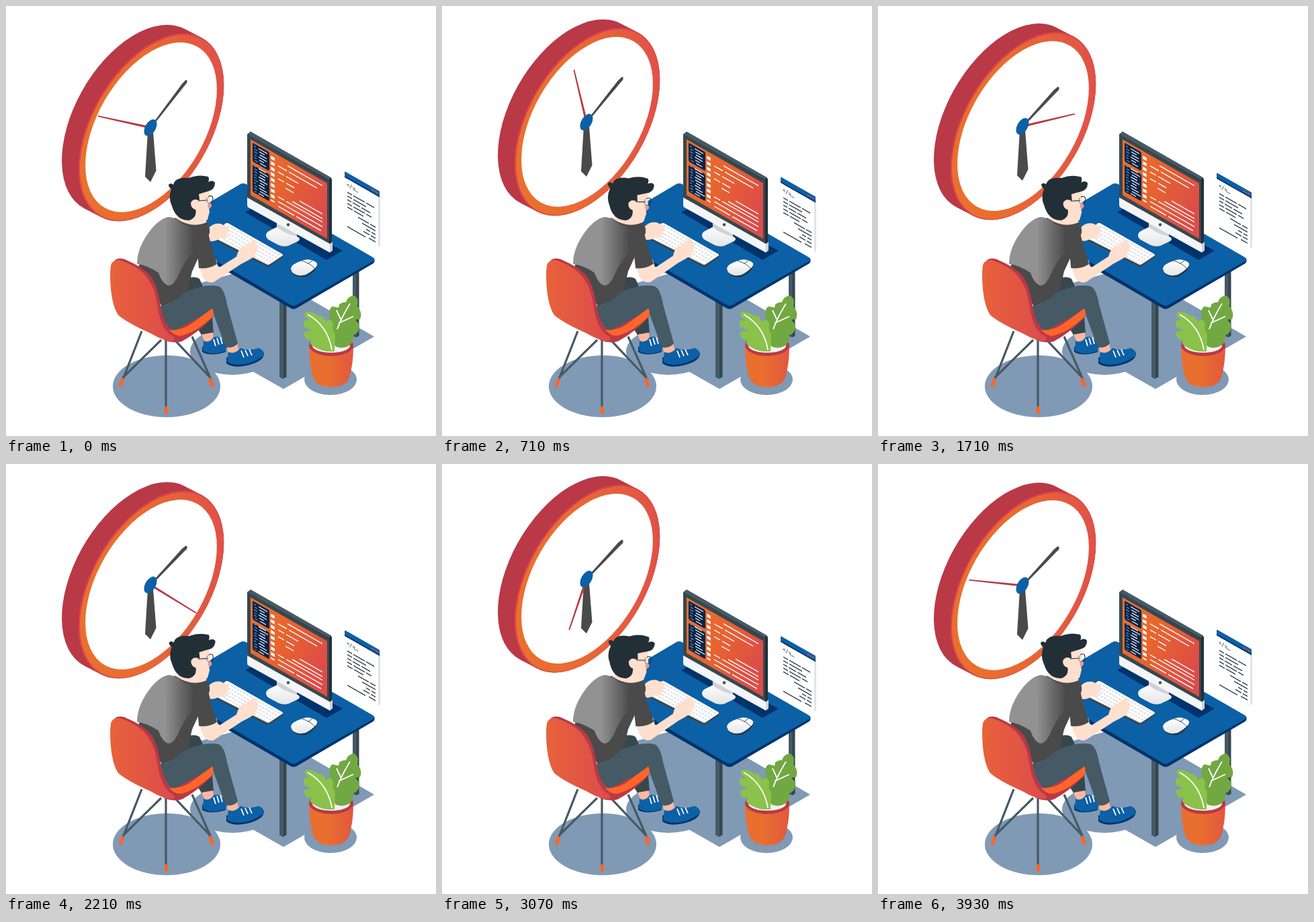
These frames come from a looping animation (640 by 640 pixels, 4 s). An HTML page:

```html
<!DOCTYPE html>
<html lang="en">
<head>
<meta charset="utf-8">
<title>Working against the clock</title>
<style>
  html, body { margin: 0; width: 100%; height: 100%; overflow: hidden; background: #fff; }
  svg { display: block; width: 100%; height: 100%; }
  .blue { fill: #0c60a6 } .navy { fill: #00336b } .crimson { fill: #b93946 } .skin { fill: #ffdfcd }
  .slate { fill: #455a64 } .dark { fill: #37474f } .char { fill: #4a4a4a } .hair { fill: #232f36 }
  .orange { fill: #ff652a } .shade { fill: #8099b5 } .white { fill: #fff }
  .line { fill: none; stroke: #fff; stroke-width: 1.8 }
</style>
</head>
<body>
<svg viewBox="0 0 640 640">
  <defs>
    <linearGradient id="ring"><stop offset=".1" stop-color="#ea702e"/><stop offset=".45" stop-color="#e96a31"/><stop offset="1" stop-color="#e05148"/></linearGradient>
    <linearGradient id="seat"><stop stop-color="#e8623b"/><stop offset="1" stop-color="#dc4b4b"/></linearGradient>
    <linearGradient id="screen" y2=".3"><stop offset=".1" stop-color="#e9702f"/><stop offset=".5" stop-color="#e7642f"/><stop offset="1" stop-color="#dc4d48"/></linearGradient>
    <linearGradient id="shirt"><stop offset=".48" stop-color="#929292"/><stop offset=".98" stop-color="#4a4a4a"/></linearGradient>
    <linearGradient id="pot"><stop offset=".4" stop-color="#e96f2e"/><stop offset="1" stop-color="#e2573f"/></linearGradient>
    <linearGradient id="base" x2="0" y2="1"><stop offset=".3" stop-color="#fafafa"/><stop offset="1" stop-color="#e3e5e7"/></linearGradient>
  </defs>

  <g class="shade">
    <ellipse cx="239" cy="566" rx="80" ry="46"/>
    <ellipse cx="483" cy="556" rx="39" ry="23"/>
    <ellipse cx="337" cy="514" rx="63" ry="35"/>
    <path d="M290 412 350 395 440 429 548 492 413 570 290 500Z"/>
  </g>

  <g id="clock">
    <g transform="matrix(.866 -.5 0 1 216 180.5)">
      <path d="M-28.5-27 0 0" stroke="#b93946" stroke-width="250" stroke-linecap="round"/>
      <circle r="125" fill="#db444b"/>
      <circle cx="1.100" cy="1.100" r="123.500" fill="url(#ring)"/>
      <circle r="113" class="white"/>
    </g>
    <g transform="translate(215 181)">
      <path class="char" d="M-4 6H4L8.500 64 0 81-8 73Z"/>
      <path id="minute" class="char" d="M7-11 9-9.500 50-61.500 54.500-67V-71L52-70.500 46.500-64.500Z"/>
      <path id="second" class="crimson" d="M0-1.700 80-.9V.9L0 1.700Z"/>
      <circle class="blue" r="11" transform="matrix(.866 -.5 0 1 0 0)"/>
    </g>
  </g>

  <g id="page">
    <path fill="#e1e3e5" d="M553 282 557 280V357L553 359Z"/>
    <g transform="matrix(1 .57 0 1 504 246)">
      <path class="white" d="M0 8H50V84H0Z"/>
      <path class="blue" d="M1 0H52V8H0V1Z"/>
      <path class="navy" d="M0 7H52V9H0Z"/>
      <path stroke="#e0524a" stroke-width="2.200" stroke-dasharray="2 1.500" d="M40 4.500h10"/>
      <text x="3" y="20.500" font-family="Roboto, sans-serif" font-size="9" fill="#37474f">&lt;/&gt;</text>
      <path stroke="#37474f" stroke-width="1.400" stroke-dasharray="1.400 1" d="M14 20h6"/>
      <path stroke="#263844" stroke-width="1.500" fill="none" d="M4 29h7m2 0h17m2 0h12M4 34.500h7m2 0h19M4 40h6m2 0h11m2 0h13M4 45.500h7m2 0h17m2 0h8M4 51h8m2 0h14M20 57h16m2 0h8M26 62.500h20M32 68h6m2 0h6M28 73.500h9m2 0h7M4 80h27M36 79h10"/>
    </g>
  </g>

  <g id="desk">
    <path class="dark" d="M516 393h9.500v98l-4 2-5.500-2Z"/>
    <path class="slate" d="M516 393h5v99l-5-2Z"/>
    <path class="dark" d="M407 432h10.500v120l-5 3-5.500-3Z"/>
    <path class="slate" d="M407 432h6v123l-6-3Z"/>
    <path class="navy" d="M234 333 548.500 377V380Q548 382 546 383.500L432 450q-4 2-8 0L234 340Z"/>
    <path class="blue" d="M349 265q4-2 8 0L546 374q5 3 0 6L432 445q-4 2-8 0L234 333Z"/>
    <path class="navy" d="M356 307 372 298 501 364 477 378Z"/>
  </g>

  <g id="monitor">
    <path fill="url(#base)" d="M387 341q0-4 6-7l10-5V321l30 16v6q7 3 2 7l-15 7q-7 2-14-1l-15-8q-4-3-4-7Z"/>
    <path fill="#cfd3d6" d="M403 321 433 337V343Q412 338 403 329Z"/>
    <path class="hair" d="M359 191 364 187 483 255q2 1 2 4V352L482 355 359 286Z"/>
    <path class="slate" d="M359 191 364 187 483 255 481 259Z"/>
    <path class="dark" d="M359 191 481 260V355L359 286Z"/>
    <g transform="matrix(1 .57 0 1 363 197)">
      <path fill="url(#screen)" d="M1 1H115V84H1Z"/>
      <path fill="#0a2547" d="M6 4H27q2 0 2 2V30q0 2-2 2H6q-2 0-2-2V6q0-2 2-2ZM6 37H27q2 0 2 2V75q0 2-2 2H6q-2 0-2-2V39q0-2 2-2Z"/>
      <path class="line" stroke-dasharray="4.500 3.600" style="stroke-width:5.500" d="M34 8V75"/>
      <path class="line" style="stroke-width:1.600" d="M56 9h52M42 17h13m3 0h42M42 26h9m3 0h18M42 36h9m3 0h12M53 44h12M74 51h34M63 58h45M42 63h9m3 0h54M42 70h66M42 77h24m3 0h37"/>
      <path id="menu" class="line" style="stroke-width:1.300"/>
      <path id="bullets" fill="none" stroke="#6c98c9" stroke-width="1.200"/>
    </g>
    <path fill="#f4f5f6" d="M359 285 482 354V367L361 300q-2-1-2-4Z"/>
    <path fill="#cfd3d6" d="M482 354 486 351V364L482 367Z"/>
    <circle cx="420" cy="325.500" r="2.200" class="char"/>
  </g>

  <g id="keyboard">
    <path class="dark" d="M309 345 391 383 412 370V374L392 388q-3 1-6-1L309 348Z"/>
    <path class="white" d="M326 324q3-2 6 0l79 45q2 2 0 3l-18 12q-3 2-6 0L308 344Z"/>
    <path id="keys" fill="none" stroke="#d9dce0" stroke-width="1.700" stroke-dasharray="3.800 1.500"/>
  </g>

  <g id="mouse">
    <path fill="#26323a" d="M424 391q6 12 21 10 10-3 17-16l1 3q-5 10-17 15-17 2-22-9Z"/>
    <path fill="url(#base)" d="M424 390q2-6 14-10 10-5 19-1 9 3 5 9-5 6-16 12-11 3-18-2-4-3-4-8Z"/>
    <path fill="none" stroke="#455a64" d="M440 379Q453 383 460 391M449 384 456 379"/>
  </g>

  <g id="plant">
    <path fill="url(#pot)" d="M451 505H517Q517 536 510 555 504 567 484 567.500 464 567 458 555 451 536 451 505Z"/>
    <ellipse cx="484" cy="505" rx="33" ry="16" class="crimson"/>
    <ellipse cx="484" cy="505.500" rx="28" ry="10.500" fill="#f5f0ec"/>
    <path fill="#72a842" d="M491 507Q474 486 482 466 479 451 486 447L495 449 496 444Q503 440 506 441 508 432 518 431 526 435 523 447 531 456 527 466L520 467 526 474Q527 487 517 490 518 500 510 506 500 511 491 507Z"/>
    <path fill="#8ac24a" d="M489 514Q471 516 457 506 450 503 455 497 441 497 444 485L455 483 443 477V468L452 468Q441 461 446 455 457 455 465 461 473 460 476 470 485 463 487 474 485 485 490 487Z"/>
    <path class="line" d="M449 459Q479 476 485 512M493 481Q500 462 512 443M498 466 492 453M495 472 517 462"/>
  </g>

  <g id="backHand">
    <path class="skin" d="M299 344V333Q308 322 319 324L331 329Q334 332 329 333L333 336 328 338 332 343 326 342 327 347 320 345Q312 351 304 350Z"/>
  </g>

  <g id="legs">
    <path class="dark" d="M262 408Q280 400 288 406L293 417 270 430ZM278 455 306 452 309 487 292 491 283 477Z"/>
    <path fill="#ffb89f" d="M291 489 308 486 309 497 296 500ZM328 508 344 503 347 514 332 518Z"/>
    <path class="navy" d="M292 507V515Q304 522 327 515V510ZM328 523V532Q340 541 366 533 385 527 384 516Z"/>
    <path class="blue" d="M294 498Q302 503 309 493 319 490 326 501 331 511 325 514 306 521 293 513ZM331 515Q341 519 349 509 361 514 376 509 386 513 383 521 364 534 347 534 334 534 329 529Z"/>
    <path class="line" d="M309 496 312 506M314 494 317 504M319 493 322 503M350 513 354 523M356 512 360 521M362 511 366 520"/>
  </g>

  <g id="body">
    <path class="skin" d="M253 319 260 305H290L299 322Q280 332 253 323Z"/>
    <g id="head">
      <path class="skin" d="M270 285 302 274 304 291 306 298 302 302 303 306 300 318Q292 324 283 320L270 318Z"/>
      <path fill="#ff8e80" d="M301 294 306 297 303 302Q299 299 301 294Z"/>
      <path class="hair" d="M246 273Q240 267 243 265 246 263 249 266 252 254 272 256 287 250 301 254 303 258 301 262 308 258 311 263 311 274 300 276 293 278 287 280L288 288 282 302Q285 315 273 319 254 320 247 298 241 286 246 273Z"/>
      <path class="skin" d="M288 290Q279 285 275 293 275 301 282 303 288 303 288 290Z"/>
      <path fill="none" stroke="#232f36" stroke-width="1.100" d="M286 290 300 289M301 284Q308 280 308 288 307 294 302 294"/>
      <path fill="none" stroke="#5d83a7" d="M299 285V291Q300 294 304 294"/>
    </g>
    <path class="char" d="M252 315Q275 332 299 322 304 329 303 338L277 395 268 434 232 447 197 389 210 350Z"/>
    <path fill="url(#shirt)" d="M243 314Q254 315 264 325 283 329 279 338 274 352 281 365 267 376 256 402 247 420 239 415 231 410 227 397 211 386 195 384 195 358 217 331 231 315 243 314Z"/>
    <path class="slate" d="M226 447Q247 446 266 426 296 413 316 417 325 420 329 444L345 502Q339 510 327 508L308 456 250 490 229 480Z"/>
  </g>

  <g id="arm">
    <path class="skin" d="M287 386 313 378 316 390 343 373Q346 360 355 357L367 349Q374 346 371 353L376 357 374 364 370 373Q360 379 350 384L309 411Q298 414 292 402Z"/>
    <path class="char" d="M280 336Q291 324 301 337 304 354 314 384 302 392 287 390L285 368Q272 354 280 336Z"/>
  </g>

  <g id="chair">
    <path fill="none" stroke="#455a64" stroke-width="3.200" d="M202 484 173 558M238 496V603M277 492 306 558M174 553 231 497M251 497 303 552"/>
    <path fill="none" stroke="#ff652a" stroke-width="5" d="M174 554 170 567M238.500 596V607M303 554 308 567"/>
    <path class="crimson" d="M162 378Q171 373 181 379 213 393 220 410 226 421 230 446 235 475 249 484L308 452V463Q285 487 262 499 249 503 235 497Z"/>
    <path class="orange" d="M243 482Q263 484 280 470L307 450Q311 456 306 464 284 484 264 490 252 493 243 482Z"/>
    <path fill="url(#seat)" d="M156 386Q160 375 172 379 204 391 213 409 222 421 226 449 231 483 249 492 254 498 245 499 232 497 215 487 181 472 167 460 155 442 155 397Z"/>
  </g>
</svg>
<script>
  const LOOP = 4000, STEP = LOOP / 56;
  const el = id => document.getElementById(id);
  const move = (id, value) => el(id).setAttribute("transform", value);
  const ease = p => (1 - Math.cos(Math.PI * p)) / 2;

  // Repeated strokes: code sidebar and keyboard rows
  let menu = "", bullets = "", keys = "";
  for (let i = 0; i < 16; i++) {
    const y = 8 + i * 4.1 + (i > 5 ? 5 : 0);
    menu += `M${13 + i % 3} ${y}h${13 - i * 5 % 7}`;
    bullets += `M${6 + i % 2} ${y}h${3 + i % 3}`;
  }
  for (let i = 0; i < 5; i++) keys += `M${330 - i * 4} ${327 + i * 3.5}l77 44`;
  el("menu").setAttribute("d", menu);
  el("bullets").setAttribute("d", bullets);
  el("keys").setAttribute("d", keys);

  function draw(now) {
    const t = Math.floor((now % LOOP + 5) / STEP) * STEP % LOOP;
    const sway = ease(t / 1000);
    move("clock", `translate(0 ${-10 * sway})`);
    move("page", `translate(0 ${10 * sway})`);
    move("head", `rotate(${6 * sway} 270 322)`);
    move("arm", `rotate(${-1.6 * sway} 295 340)`);
    move("backHand", `translate(0 ${-2.5 * sway})`);
    move("second", `rotate(${192.3 + 360 * t / LOOP})`);
    move("minute", `matrix(1 ${0.24 * ease(Math.min(t / 2000, 1))} 0 1 0 0)`);
  }

  const start = performance.now();
  (function tick() {
    draw(performance.now() - start);
    requestAnimationFrame(tick);
  })();
</script>
</body>
</html>
```
